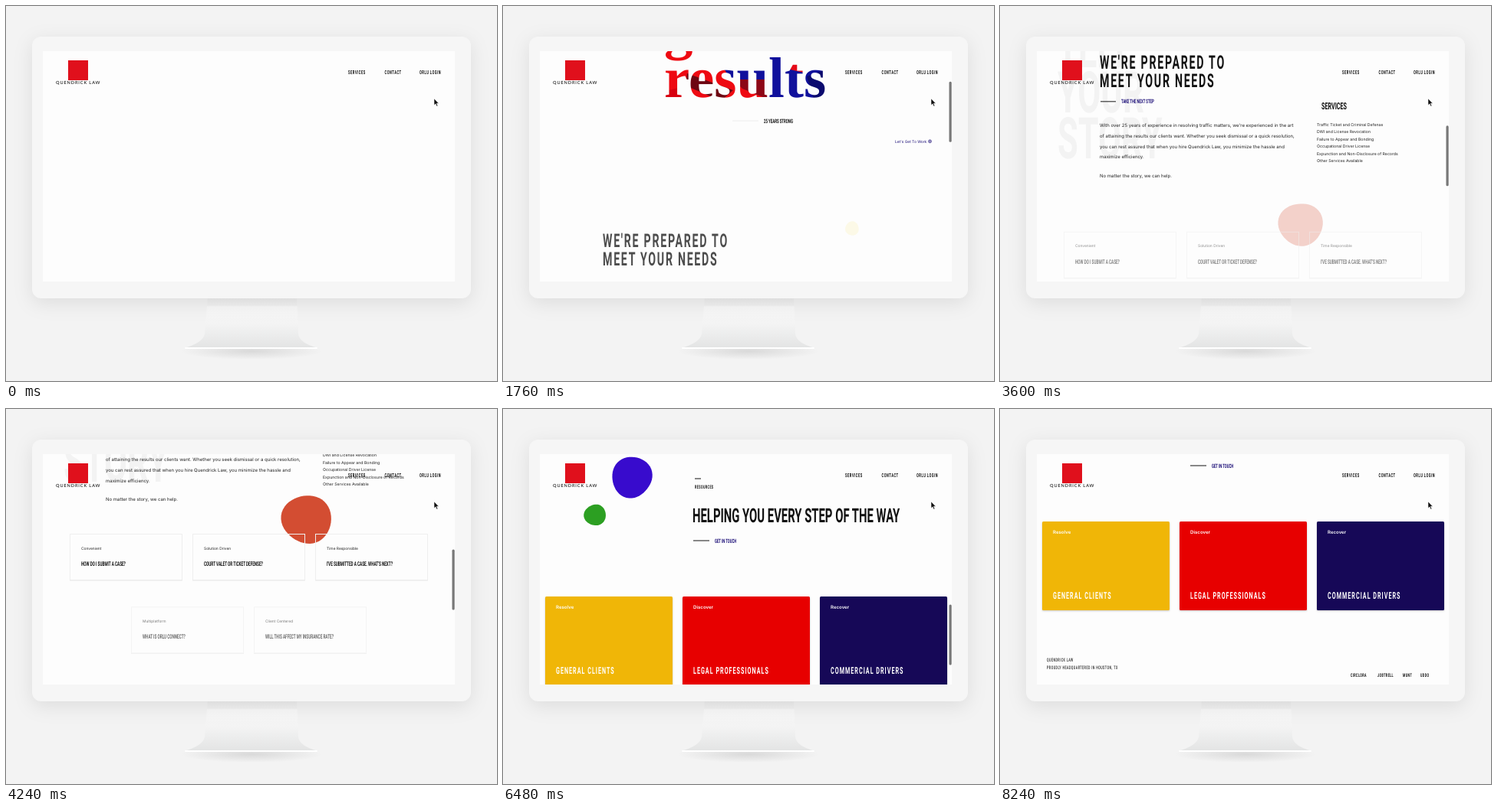
An HTML page that plays this animation: 640x490 px, repeating every 8320 ms.

```html
<!DOCTYPE html>
<html lang="en">
<head>
<meta charset="utf-8">
<title>Law firm site on a desktop screen</title>
<style>
  html, body { margin: 0; width: 100%; height: 100%; overflow: hidden; background: #f3f3f3; }
  svg { display: block; width: 640px; height: 490px; }
  text { text-rendering: geometricPrecision; white-space: pre; }
  .cond { font-family: Roboto, "Liberation Sans", sans-serif; font-weight: 700; }
  .body { font-family: Inter, "Noto Sans", sans-serif; }
  .hero { font: 700 75px "Liberation Serif", "Noto Serif", serif; fill: url(#facets); }
  .mark { font: 5.7px Lato, "Open Sans", sans-serif; letter-spacing: .85px; }
  .monitor { filter: drop-shadow(0 6px 12px rgba(0, 0, 0, .09)); }
  .box { fill: none; stroke: #efefef; }
  .tile { filter: drop-shadow(0 1px 1px rgba(0, 0, 0, .2)); }
</style>
</head>
<body>
<svg viewBox="0 0 640 490">
  <defs>
    <clipPath id="screen"><rect x="48" y="59" width="537" height="301"/></clipPath>
    <linearGradient id="neck" x2="0" y2="1">
      <stop offset="0" stop-color="#ececec"/>
      <stop offset=".16" stop-color="#f1f1f1"/>
      <stop offset=".2" stop-color="#f8f8f8"/>
      <stop offset=".55" stop-color="#f3f3f3"/>
      <stop offset="1" stop-color="#e3e4e4"/>
    </linearGradient>
    <radialGradient id="floor">
      <stop offset="0" stop-color="#d9d9d9"/>
      <stop offset="1" stop-color="#d9d9d9" stop-opacity="0"/>
    </radialGradient>
    <pattern id="facets" patternUnits="userSpaceOnUse" x="200" y="140" width="240" height="160">
      <rect width="240" height="160" fill="#ee0a12"/>
      <path d="M0 122L40 112 20 160H0Z" fill="#d80010"/>
      <path d="M40 96L100 118 84 132 38 112Z" fill="#6d0712"/>
      <path d="M76 0H240V160H150L140 104 96 104 72 60Z" fill="#10109c"/>
      <path d="M100 104L142 104 146 130 112 116Z" fill="#8d0716"/>
      <path d="M166 60L200 66 196 96 170 90Z" fill="#e60b18"/>
      <path d="M196 100L240 84V160H214Z" fill="#0b0a6e"/>
    </pattern>
  </defs>

  <rect width="640" height="490" fill="#f3f3f3"/>
  <ellipse cx="320" cy="451" rx="92" ry="11" fill="url(#floor)"/>
  <path d="M263 380H379L381 428Q382 440 405 446.500H234Q257 440 259 428Z" fill="url(#neck)"/>
  <path d="M234 447H405" stroke="#fff" stroke-width="1.800" stroke-linecap="round"/>
  <rect class="monitor" x="34" y="40" width="572" height="342" rx="12" fill="#f6f6f6"/>
  <rect x="48" y="59" width="537" height="301" fill="#fdfdfd"/>

  <g clip-path="url(#screen)">
    <g id="page"></g>
    <g id="header"></g>
    <rect id="thumb" x="581.500" width="3.200" height="79" rx="1.600" fill="#787878"/>
    <path d="M558 121V129.600L560 127.800 561.400 131 562.800 130.400 561.400 127.300H564Z"
      fill="#111" stroke="#fff" stroke-width=".5"/>
  </g>
</svg>

<script>
const LOOP = 8320, STEP = 80, FADE = 800;
const NAVY = '#1c0f78', INK = '#111';
const $ = id => document.getElementById(id);

// ---- drawing helpers ----
const cond = (x, y, size, str, fill = INK, gap = 0) =>
  `<text class="cond" transform="translate(${x} ${y}) scale(.58 1)" font-size="${size}"
    letter-spacing="${gap * size}" fill="${fill}">${str}</text>`;
const body = (x, y, size, str, fill = '#222', weight = 400) =>
  `<text class="body" x="${x}" y="${y}" font-size="${size}" font-weight="${weight}" fill="${fill}">${str}</text>`;
const lines = (draw, x, y, pitch, size, list, ...style) =>
  list.map((s, i) => draw(x, y + i * pitch, size, s, ...style)).join('');
const rule = (x1, x2, y, color = INK) =>
  `<path d="M${x1} ${y}H${x2}" stroke="${color}" stroke-width="1"/>`;

// A part fades in from `start` while rising by `rise` pixels.
const part = (start, rise, content) =>
  `<g class="part" data-start="${start}" data-rise="${rise}">${content}</g>`;
const blob = (start, rise, x, y, r, fill, seed) =>
  part(start, rise, `<path class="blob" data-x="${x}" data-y="${y}" data-r="${r}" data-seed="${seed}" fill="${fill}"/>`);
const question = (x, y, label, title) =>
  `<rect class="box" x="${x + .5}" y="${y + .5}" width="146" height="60"/>` +
  `<path d="M${x} ${y + 61}h147" stroke="#e9e9e9"/>` +
  body(x + 15, y + 20.5, 4.9, label) + cond(x + 15, y + 41.8, 8, title);
const tile = (x, color, label, title) =>
  `<rect class="tile" x="${x}" y="990" width="166" height="116" rx="1.5" fill="${color}"/>` +
  body(x + 14, 1006.2, 6.1, label, '#fff', 600) + cond(x + 14, 1091.4, 12.4, title, '#fff', .14);

// ---- content, placed in page coordinates ----
$('page').innerHTML = [
  part(160, 30, '<text class="hero" x="210" y="203">great</text><text class="hero" x="210" y="267">results</text>'),
  part(480, 20, rule(299, 333, 298, '#eee') + cond(340, 300.8, 7.5, '25 YEARS STRONG')),
  part(640, 20, body(511, 326.8, 4.9, "Let's Get To Work", NAVY) +
    `<circle cx="556.5" cy="324.800" r="1.900" fill="none" stroke="${NAVY}" stroke-width=".8"/>
     <circle cx="556.5" cy="324.800" r=".8" fill="${NAVY}"/>`),

  part(1850, 0, lines(cond, 75, 447, 59.5, 75, ['TELL', 'YOUR', 'STORY'], '#f3f3f3')),
  blob(1680, 53, 455, 391, 10.4, '#f8d327', 1),
  part(1160, 56, lines(cond, 130, 449, 24, 24.5, ["WE'RE PREPARED TO", 'MEET YOUR NEEDS'], INK, .12)),
  part(1700, 50, rule(131, 151, 492) + cond(158, 494.6, 7.4, 'TAKE THE NEXT STEP', NAVY)),
  part(1960, 50, lines(body, 130, 525.4, 13.7, 6, [
    "With over 25 years of experience in resolving traffic matters, we're experienced in the art",
    'of attaining the results our clients want. Whether you seek dismissal or a quick resolution,',
    'you can rest assured that when you hire Quendrick Law, you minimize the hassle and',
    'maximize efficiency.'])),
  part(2760, 6, body(130, 591.2, 6, 'No matter the story, we can help.')),
  part(1960, 50, cond(419, 502.6, 12.4, 'SERVICES') + lines(body, 413, 523.8, 9.5, 5.2, [
    'Traffic Ticket and Criminal Defense', 'DWI and License Revocation',
    'Failure to Appear and Bonding', 'Occupational Driver License',
    'Expunction and Non-Disclosure of Records', 'Other Services Available'])),

  blob(3400, 50, 392, 615, 32, '#d34d32', 2),
  part(3200, 56, question(83, 634, 'Convenient', 'HOW DO I SUBMIT A CASE?') +
    question(243, 634, 'Solution Driven', 'COURT VALET OR TICKET DEFENSE?') +
    question(403, 634, 'Time Responsible', "I'VE SUBMITTED A CASE. WHAT'S NEXT?")),
  part(3760, 66, question(163, 703, 'Multiplatform', 'WHAT IS ORLU CONNECT?') +
    question(323, 703, 'Client Centered', 'WILL THIS AFFECT MY INSURANCE RATE?')),

  blob(4640, 50, 168, 834, 26.5, '#380bcd', 3),
  blob(5000, 62, 120, 883.5, 14, '#2c9f22', 4),
  part(4640, 50, rule(250, 258, 836) + cond(250, 848.7, 6.4, 'RESOURCES', INK, .11)),
  part(5000, 24, cond(247, 893, 25.6, 'HELPING YOU EVERY STEP OF THE WAY')),
  part(5500, 49, rule(248, 269, 917) + cond(276, 919.8, 7.4, 'GET IN TOUCH', NAVY)),

  part(5650, 56, tile(55, '#f0b607', 'Resolve', 'GENERAL CLIENTS') +
    tile(234, '#e70000', 'Discover', 'LEGAL PROFESSIONALS') +
    tile(413, '#160857', 'Recover', 'COMMERCIAL DRIVERS')),
  part(6900, 20, lines(cond, 61, 1173.3, 9.5, 6.4,
    ['QUENDRICK LAW', 'PROUDLY HEADQUARTERED IN HOUSTON, TX'], '#444', .12)),
  part(6900, 20, [[457, 'CIRCLORA'], [492, 'JOBTRELL'], [525, 'MUNT'], [548, 'UDDO']]
    .map(([x, s]) => cond(x, 1193.4, 6.4, s, INK, .11)).join(''))
].join('');

$('header').innerHTML =
  '<rect x="81" y="71" width="26" height="26" fill="#e0101c"/>' +
  '<text class="mark" x="65" y="102.2">QUENDRICK LAW</text>' +
  cond(446, 88.6, 7, 'SERVICES', INK, .13) + cond(493.5, 88.6, 7, 'CONTACT', INK, .13) +
  cond(539, 88.6, 7, 'ORLU LOGIN', INK, .13);

// ---- motion ----
const clamp = v => Math.min(1, Math.max(0, v));
const stops = [[0, 0], [900, 0], [1760, 148], [2880, 254], [4240, 471], [5600, 626], [6480, 745], [7300, 843], [LOOP, 843]];
const slope = i => (stops[i + 1][1] - stops[i][1]) / (stops[i + 1][0] - stops[i][0]);
const tangent = i => {
  if (i === 0 || i === stops.length - 1) return 0;
  const a = slope(i - 1), b = slope(i);
  return a * b ? 2 * a * b / (a + b) : 0;
};

// Smooth monotone curve through the scroll stops.
function scrollAt(t) {
  const i = stops.findIndex((s, k) => k + 1 < stops.length && t <= stops[k + 1][0]);
  const [t0, y0] = stops[i], [t1, y1] = stops[i + 1];
  const h = t1 - t0, u = (t - t0) / h, v = 1 - u;
  return y0 * (1 + 2 * u) * v * v + y1 * u * u * (3 - 2 * u) +
    h * u * v * (tangent(i) * v - tangent(i + 1) * u);
}

function blobPath(x, y, r, seed, t) {
  const n = 48, turn = t / 1500 + seed * 2;
  let d = '';
  for (let i = 0; i < n; i++) {
    const a = i / n * 2 * Math.PI;
    const k = r * (1 + .025 * Math.cos(2 * a - turn) + .03 * Math.cos(3 * a + turn * 1.3));
    d += `${i ? 'L' : 'M'}${(x + k * Math.cos(a)).toFixed(2)} ${(y + k * Math.sin(a)).toFixed(2)}`;
  }
  return d + 'Z';
}

const parts = [...document.querySelectorAll('.part')];
const blobs = [...document.querySelectorAll('.blob')];

function render(t) {
  const y = scrollAt(t);
  $('page').setAttribute('transform', `translate(0 ${-y})`);
  $('thumb').setAttribute('y', 60 + y * .2624);
  $('thumb').setAttribute('opacity', clamp((t - 880) / 160) * clamp((7840 - t) / 300));
  for (const g of parts) {
    const p = clamp((t - g.dataset.start) / FADE);
    g.setAttribute('opacity', p);
    g.setAttribute('transform', `translate(0 ${g.dataset.rise * (1 - p)})`);
  }
  for (const b of blobs) {
    const { x, y, r, seed } = b.dataset;
    const grow = .85 + .15 * clamp((t - b.parentNode.dataset.start) / FADE);
    b.setAttribute('d', blobPath(+x, +y, r * grow, +seed, t));
  }
}

const begin = performance.now();
function tick() {
  const t = (performance.now() - begin) % LOOP;
  render(Math.floor(t / STEP) * STEP);
  requestAnimationFrame(tick);
}
tick();
</script>
</body>
</html>
```
